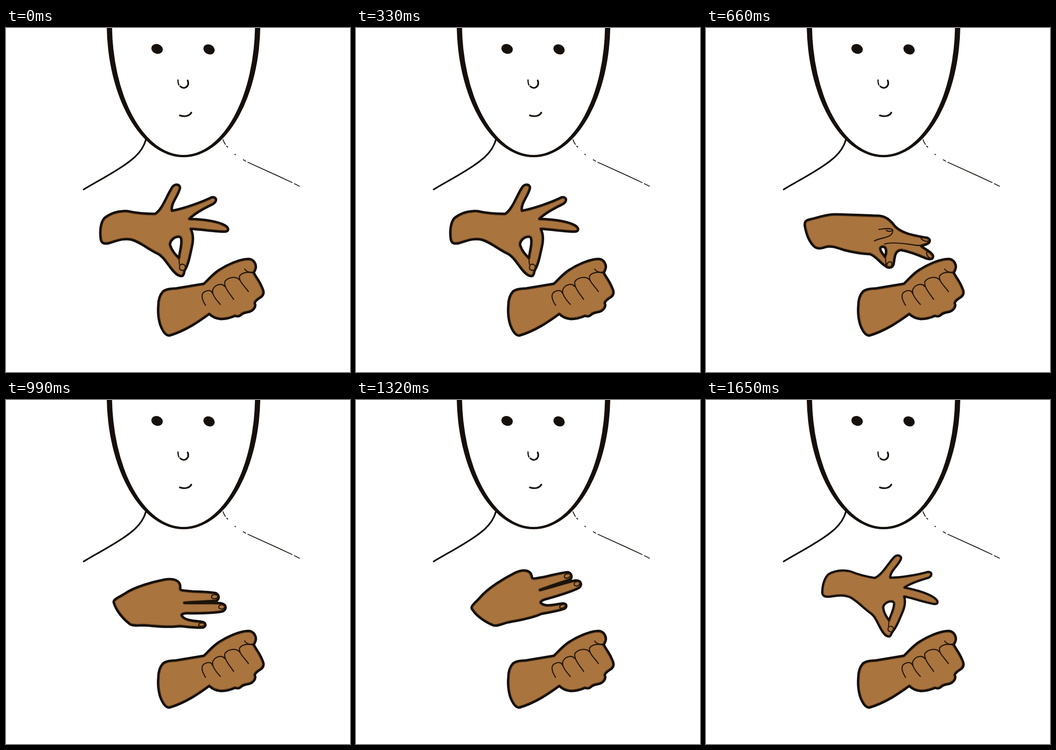
An HTML page that plays this animation: 748 by 748 pixels, repeating every 1980 ms.

```html
<!DOCTYPE html>
<html lang="en">
<head>
<meta charset="utf-8">
<title>Signing hands</title>
<style>
  html, body { margin: 0; width: 100%; height: 100%; overflow: hidden; background: #fff; }
  svg { display: block; width: 100vw; height: 100vh; }
  path, ellipse { stroke-linecap: round; stroke-linejoin: round; }
  .ink { fill: #15100b; }
  .line { fill: none; stroke: #15100b; }
  .skin { fill: #aa743f; fill-rule: evenodd; }
  .shade { fill: none; stroke: #5f3c1b; stroke-width: 7.6; stroke-opacity: .75; }
  .edge { fill: none; stroke: #15100b; stroke-width: 5; }
  .crease { fill: none; stroke: #22160b; stroke-width: 2.4; }
</style>
</head>
<body>
<svg id="stage" viewBox="0 0 748 748">
  <!-- head: thick at the sides, thin at the chin -->
  <path class="ink" fill-rule="evenodd" d="M219 -10a167 291 0 0 0 334 0a167 291 0 0 0 -334 0Z
    M230.500 -10a155.500 286 0 0 0 311 0a155.500 286 0 0 0 -311 0Z"/>
  <ellipse class="ink" cx="328.5" cy="45.5" rx="12.6" ry="10.5" transform="rotate(20 328.5 45.5)"/>
  <ellipse class="ink" cx="441.5" cy="46.5" rx="12.6" ry="10.5" transform="rotate(28 441.5 46.5)"/>
  <g class="line" stroke-width="3.6">
    <path stroke-width="2.6" d="M374 113Q374 120 376 124"/>
    <path d="M379 127C386 133 393 130 396 123Q397 118 395 114"/>
    <path d="M378 190C389 194 399 191 403 184"/>
    <path d="M304 243C299 262 286 277 270 289C242 311 202 331 169 351"/>
  </g>
  <g class="line" stroke-width="1.9">
    <path d="M472 243Q474 249 477 253M480 257L482 259M497.500 274.500L499 275.500"/>
    <path d="M516 286.500L521 289.500M526 292C555 305 590 321 622 336M627 338.500L638 344"/>
  </g>
</svg>
<script>
const NS = 'http://www.w3.org/2000/svg';
const stage = document.getElementById('stage');

function add(parent, tag, attrs) {
  const node = document.createElementNS(NS, tag);
  for (const key in attrs) node.setAttribute(key, attrs[key]);
  return parent.appendChild(node);
}

const shapes = {
  fist: {
    outline: `M331 604C331 592 333 582 341 573C348 567 358 567 370 566L412 559L430 556
      C438 549 450 534 465 525C484 513 510 502 528 502C540 503 545 515 543 523Q541 529 539 532
      C543 541 550 548 556 562C561 572 562 578 556 584C550 589 543 591 541 598
      C545 606 538 614 530 617C522 619 515 619 511 624C505 629 501 627 498 626
      C487 631 478 633 467 633C455 632 448 628 442 622C420 638 390 659 355 669
      C346 669 339 656 335 645C331 632 330 616 331 604Z`,
    creases: `M434 603C426 591 423 579 431 574C439 569 447 570 449 577
      M466 601C457 591 446 578 450 568C456 556 471 555 475 562
      M495 590C485 576 473 562 476 551C484 541 501 539 508 548
      M527 573C518 560 505 550 508 539C515 530 529 530 538 533
      M519 524C523 531 534 533 540 529`
  },
  pinch: {
    outline: `M206 460C203 440 206 422 214 413C228 402 246 397 264 398C277 401 300 404 324 404
      C340 395 350 362 362 345C368 337 381 340 378 350C374 366 358 382 361 397
      C385 393 425 379 447 368C460 366 459 378 450 383C432 392 412 402 399 415
      C430 416 460 420 476 429C486 435 485 442 476 443C455 443 425 438 402 437
      C407 447 408 462 404 478C400 494 398 512 389 527C387 531 388 536 384 539
      C374 542 364 530 356 519C346 506 340 496 330 491C310 482 290 464 271 460
      C255 457 240 463 224 468C214 470 208 469 206 460Z
      M375 454C366 454 356 463 357 472C361 485 369 493 376 500C377 487 382 475 381 462C381 456 379 454 375 454Z`,
    creases: `M376 500L377 514M378 525C375 517 380 512 386 514C392 517 391 524 387 527Q381 528 378 524`
  },
  turn: {
    outline: `M215 432C213 421 217 418 226 416C245 412 260 405 280 405C310 405 350 408 375 408
      C392 409 402 419 411 431C425 445 445 450 481 456C489 459 488 466 482 469C477 472 473 472 468 474
      C478 482 492 488 494 496C494 504 486 504 478 501C462 494 440 486 424 483
      C410 485 411 498 408 514C405 523 396 523 389 517C378 510 370 497 357 492
      C335 491 320 488 300 483C285 478 270 472 258 477C248 481 238 480 232 472C223 462 218 448 215 432Z
      M379 479C382 474 390 475 391 482C392 488 391 493 389 497C385 491 379 486 379 479Z`,
    creases: `M376 438C386 437 398 434 405 438C408 443 404 450 397 453C387 457 375 458 366 463
      M392 440Q398 444 404 441M388 470C400 465 425 468 440 470Q455 473 470 473
      M389 496Q392 507 391 517M394 519C391 511 398 507 403 509C406 514 403 519 402 522
      M467 456C470 463 479 465 486 463M492 502C483 500 478 493 480 487C484 486 490 490 494 496`
  },
  flat: {
    outline: `M234 440C233 433 244 430 258 421C280 406 320 395 346 390C366 387 381 393 379 409
      C377 415 390 414 405 416C425 417 445 417 457 420C465 425 464 435 456 437
      C445 438 415 439 388 441C420 442 455 440 468 442C481 445 480 457 470 460
      C450 464 420 464 400 464C390 463 382 465 382 468C388 480 410 480 425 482
      C437 483 436 494 427 495C405 496 385 492 376 492C350 496 320 491 300 490
      C285 490 278 492 270 488C255 477 239 458 234 440Z`,
    creases: `M388 441C410 440 435 440 460 439
      M447 430C445 423 455 421 461 426C461 432 452 434 447 430
      M463 452C461 445 470 443 476 448C476 454 468 457 463 452
      M419 490C418 485 427 483 432 487C432 492 424 494 419 490`
  }
};

function drawHand(name, id, transform = '') {
  const { outline, creases } = shapes[name];
  const group = add(stage, 'g', { transform });
  const clip = add(group, 'clipPath', { id });
  add(clip, 'path', { d: outline, 'clip-rule': 'evenodd' });
  add(group, 'path', { class: 'skin', d: outline });
  add(group, 'path', { class: 'shade', d: outline, 'clip-path': `url(#${id})` });
  add(group, 'path', { class: 'edge', d: outline });
  add(group, 'path', { class: 'crease', d: creases });
  return group;
}

drawHand('fist', 'fistClip');
const poses = [
  drawHand('pinch', 'startClip'),
  drawHand('turn', 'turnClip'),
  drawHand('flat', 'flatClip'),
  drawHand('flat', 'liftClip', 'matrix(.962 -.272 .272 .962 -93.1 94.4)'),
  drawHand('pinch', 'endClip', 'matrix(.893 .15 -.157 .879 140.8 -17)')
];

const STEP = 330;
const order = [0, 0, 1, 2, 3, 4];

function show(now) {
  const current = order[Math.floor(now / STEP) % order.length];
  poses.forEach((pose, i) => { pose.style.display = i === current ? '' : 'none'; });
}

const start = performance.now();
function tick() {
  show(performance.now() - start);
  requestAnimationFrame(tick);
}
tick();
</script>
</body>
</html>
```
